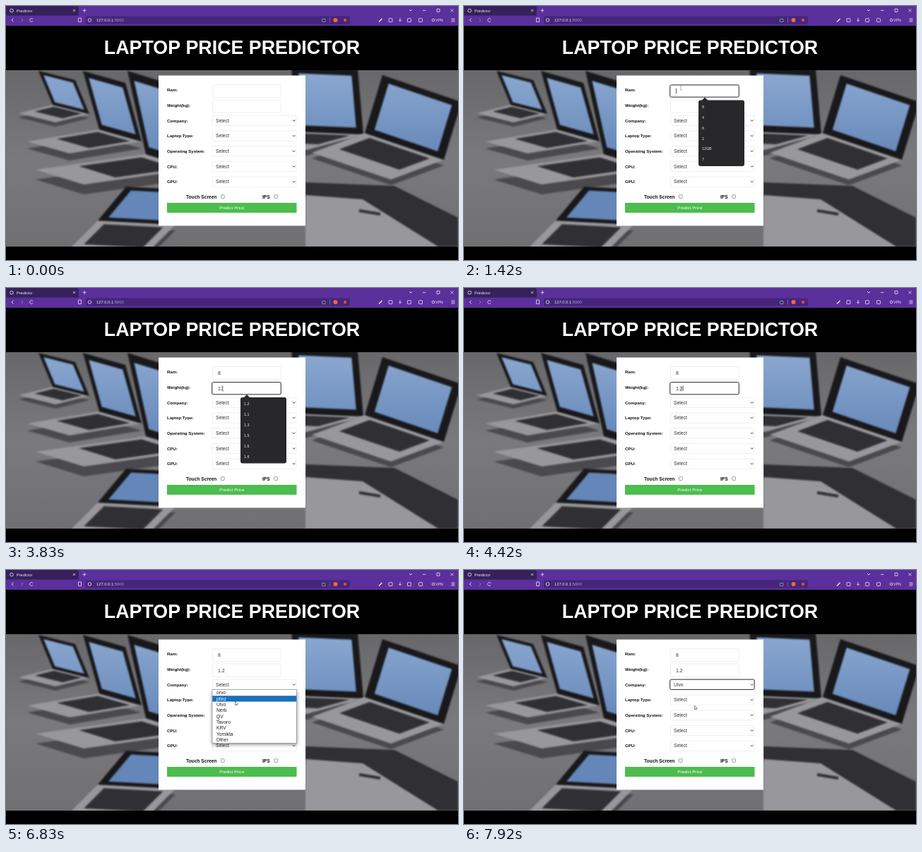
Animation, 640 px wide and 360 px high, one loop 8000 ms. Source, as an HTML page with a canvas:

```html
<!DOCTYPE html>
<html lang="en">
<head>
<meta charset="utf-8">
<title>Predictor</title>
<style>
html, body { margin: 0; width: 100%; height: 100%; overflow: hidden; background: #000; }
canvas { display: block; width: 640px; height: 360px; }
</style>
</head>
<body>
<canvas id="stage"></canvas>
<script>
const LOOP = 8000, W = 640, H = 360;
const dpr = window.devicePixelRatio || 1;
const SANS = '"Liberation Sans", Arial, sans-serif';

function prepare(canvas) {
  canvas.width = W * dpr;
  canvas.height = H * dpr;
  const c = canvas.getContext('2d');
  c.scale(dpr, dpr);
  return c;
}

const screenCtx = prepare(document.getElementById('stage'));
const base = document.createElement('canvas');
let g = prepare(base);

function rect(x, y, w, h, fill) {
  g.fillStyle = fill;
  g.fillRect(x, y, w, h);
}

function round(x, y, w, h, r, fill, stroke, width = 0.8) {
  g.beginPath();
  g.roundRect(x, y, w, h, r);
  if (fill) { g.fillStyle = fill; g.fill(); }
  if (stroke) { g.strokeStyle = stroke; g.lineWidth = width; g.stroke(); }
}

function path(points) {
  g.beginPath();
  points.forEach(p => g.lineTo(p[0], p[1]));
}

function poly(fill, ...points) {
  path(points);
  g.fillStyle = fill;
  g.fill();
}

function line(color, width, ...points) {
  path(points);
  g.strokeStyle = color;
  g.lineWidth = width;
  g.stroke();
}

function dot(x, y, r, fill) {
  g.beginPath();
  g.arc(x, y, r, 0, 7);
  g.fillStyle = fill;
  g.fill();
}

function ring(x, y, r, color, from = 0, to = 7) {
  g.beginPath();
  g.arc(x, y, r, from, to);
  g.strokeStyle = color;
  g.lineWidth = 0.8;
  g.stroke();
}

// V-shaped mark pointing along (dx, dy)
function chevron(x, y, dx, dy, color) {
  line(color, 0.9, [x - dx - dy, y - dy - dx], [x, y], [x - dx + dy, y - dy + dx]);
}

function cross(x, y, r, color) {
  line(color, 0.8, [x - r, y - r], [x + r, y + r]);
  line(color, 0.8, [x - r, y + r], [x + r, y - r]);
}

function text(str, x, y, size, color = '#111', weight = 400, align = 'left') {
  g.font = `${weight} ${size}px ${SANS}`;
  g.fillStyle = color;
  g.textAlign = align;
  g.fillText(str, x, y);
}

function vertical(y0, y1, ...colors) {
  const grad = g.createLinearGradient(0, y0, 0, y1);
  colors.forEach((c, i) => grad.addColorStop(i / (colors.length - 1), c));
  return grad;
}

const FRAME = '#19191c', KEYS = '#303034', SHELL = '#98989c';

// Parallelogram from corner p along u and v, shrunk towards its middle
function panel(fill, p, u, v, inset = 0) {
  const at = (a, b) => [p[0] + u[0] * a + v[0] * b, p[1] + u[1] * a + v[1] * b];
  const lo = inset, hi = 1 - inset;
  poly(fill, at(lo, lo), at(hi, lo), at(hi, hi), at(lo, hi));
}

// Hinge starts at p and runs along hinge; lid and front are the other two edges
function laptop(p, hinge, lid, front, edge) {
  panel('#4a4a4e', [p[0], p[1] + edge], hinge, front);
  panel(SHELL, p, hinge, front);
  panel(KEYS, p, hinge, [front[0] * 0.75, front[1] * 0.75], 0.12);
  panel(FRAME, p, hinge, lid);
  panel(vertical(91, 220, '#8ba8d0', '#6486b8'), p, hinge, lid, 0.1);
}

function drawPhoto() {
  g.save();
  g.beginPath();
  g.rect(0, 91, W, 250);
  g.clip();
  rect(0, 91, W, 250, vertical(91, 341, '#68686b', '#7a7a7d', '#707073'));
  g.filter = 'blur(1.3px)';
  for (let i = 0; i < 3; i++) {
    laptop([66 + 66 * i, 140 + 35 * i], [52 + 8 * i, 13 + 4 * i],
      [-20 - 3 * i, -48 - 35 * i], [-48 - 54 * i, 12 + 5 * i], 6 + 4 * i);
  }
  laptop([130, 304], [110, 6], [40, -48], [-50, 50], 8);
  laptop([412, 178], [94, 4], [-8, -92], [-80, 22], 8);
  laptop([508, 180], [112, 38], [25, -82], [-75, 28], 8);
  poly(KEYS, [424, 250], [550, 255], [640, 300], [640, 341], [610, 341], [424, 272]);
  poly(SHELL, [424, 268], [505, 274], [612, 341], [424, 341]);
  line(KEYS, 4, [500, 290], [530, 295]);
  g.restore();
}

function drawBrowser() {
  const ink = '#eee6f6', dim = '#9a7fc0';
  rect(0, 0, W, 28, '#5b2f9c');
  round(0, 0, 103, 13.5, [0, 3, 0, 0], '#36215c');
  round(113, 14.5, 374, 11, 2, '#45267a');
  ring(8, 6.5, 2.4, ink);
  text('Predictor', 15, 8.6, 5.6, ink);
  cross(96.5, 6.3, 1.5, ink);
  line(ink, 0.8, [108.5, 6.3], [113.5, 6.3]);
  line(ink, 0.8, [111, 3.8], [111, 8.8]);

  chevron(8, 20, -2.4, 0, ink);
  chevron(24, 20, 2.4, 0, dim);
  ring(36, 20, 2.4, ink, 0.5, 5.8);
  round(102.5, 17, 4, 5.5, 0, null, ink);
  ring(118.5, 20, 2.3, ink);
  text('127.0.0.1', 128, 22.1, 5.8, ink);
  text(':5000', 128 + g.measureText('127.0.0.1').width, 22.1, 5.8, '#b29fd0');
  round(447.5, 18.5, 4.5, 4, 0, null, '#86a8a0');
  line(dim, 0.6, [458.5, 16.5], [458.5, 23.5]);
  dot(466.5, 20, 3, '#f06a32');
  dot(480, 20, 2.2, '#e04a48');

  line(ink, 1.4, [528, 22.5], [532.5, 18]);
  for (const x of [542, 568.5, 584.5]) round(x, 17.7, 5, 4.8, 0.6, null, ink);
  line(ink, 0.8, [558, 17], [558, 21.5]);
  chevron(558, 21.7, 0, 1.8, ink);
  ring(605, 20, 1.8, ink);
  text('VPN', 608, 22, 5.2, ink);
  for (let y = 18; y < 23; y += 2) line(ink, 0.8, [630.5, y], [635.5, y]);

  chevron(573, 7, 0, 2, ink);
  line(ink, 0.8, [590, 6.3], [594.5, 6.3]);
  round(610, 4.2, 4, 4, 0, null, ink);
  cross(631.5, 6.3, 2, ink);
}

const LABELS = ['Ram:', 'Weight(kg):', 'Company:', 'Laptop Type:', 'Operating System:', 'CPU:', 'GPU:'];
const BRANDS = ['orvo', 'plinz', 'Ulvo', 'Nerb', 'QV', 'Tavoro', 'KRV', 'Yomikta', 'Other'];
const BORDER = '#ebebf0';
const rowY = i => 119 + i * 21.67;

function checkbox(label, x, boxX) {
  text(label, x, 272.7, 6.65, '#111', 700);
  round(boxX, 267.7, 4.8, 4.8, 0.8, '#fff', '#777', 0.7);
}

function drawForm() {
  rect(216, 98.5, 208, 213, '#fff');
  LABELS.forEach((label, i) => {
    const y = rowY(i);
    text(label, 228, y + 2.2, 6.05, '#111', 700);
    if (i < 2) {
      round(292.5, y - 7.5, 96.5, 18, 1, null, BORDER);
    } else {
      round(292.5, y - 7, 118.5, 14.2, 1, null, BORDER);
      if (i > 2) text('Select', 297, y + 2.4, 6.8, '#333');
      chevron(407.7, y + 0.9, 0, 1.8, '#222');
    }
  });
  checkbox('Touch Screen', 255, 304.4);
  checkbox('IPS', 363, 379.7);
  rect(228, 279, 183.5, 14, '#4cbd4e');
  text('Predict Price', 319.8, 288.2, 6.2, '#fff', 400, 'center');
}

function drawBase() {
  rect(0, 0, W, H, '#000');
  drawPhoto();
  rect(0, 28, W, 63, '#000');
  text('LAPTOP PRICE PREDICTOR', 320, 68.4, 26.8, '#fff', 700, 'center');
  drawBrowser();
  drawForm();
}

function popup(top, items) {
  poly('#28282b', [336.5, top + 0.5], [341, top - 4], [345.5, top + 0.5]);
  round(332, top, 65, 93.5, 3, '#28282b');
  items.forEach((item, i) => text(item, 337, top + 11.3 + i * 14.9, 5.3, '#f0f0f2'));
}

function brandList(active) {
  g.save();
  g.shadowColor = 'rgba(0,0,0,.45)';
  g.shadowBlur = 5 * dpr;
  g.shadowOffsetY = 2 * dpr;
  rect(292, 169.5, 119.5, 76, '#fff');
  g.restore();
  round(292, 169.5, 119.5, 76, 0, null, '#77777c', 0.6);
  BRANDS.forEach((name, i) => {
    const y = 174 + i * 8.34;
    if (i === active) rect(292.3, y - 4.1, 119, 8.3, '#1a6ec0');
    text(name, 298, y + 2.2, 6.7, i === active ? '#fff' : '#222');
  });
}

function focusBox(y, w, h) {
  round(291.7, y, w, h, 1.8, null, '#2c2c34', 1);
}

function typed(str, y, focused) {
  text(str, 300, y, 7, '#333');
  if (focused) {
    const x = 300.4 + g.measureText(str).width;
    line('#111', 0.7, [x, y - 6.2], [x, y + 1.4]);
  }
}

// start, end, dx, dy
const MOVES = [[80, 830, -11, 17], [2500, 2830, 0, 27], [5080, 5250, 13, 18],
  [5500, 6250, 4.5, 25], [7670, 7900, 2, 6]];

function mouseAt(t) {
  let x = 318, y = 99;
  for (const [from, to, dx, dy] of MOVES) {
    const k = Math.min(1, Math.max(0, (t - from) / (to - from)));
    const eased = k * k * (3 - 2 * k);
    x += dx * eased;
    y += dy * eased;
  }
  return [x, y];
}

function drawMouse(t) {
  if (t < MOVES[0][0]) return;
  const [x, y] = mouseAt(t);
  const overField = t > 600 && t < 5150;
  if (overField) {
    const color = '#9a9aa4';
    line(color, 0.8, [x, y - 3], [x, y + 3]);
    for (const end of [-3, 3]) line(color, 0.8, [x - 1.3, y + end], [x + 1.3, y + end]);
  } else {
    const tip = [[x, y], [x, y + 5.8], [x + 1.6, y + 4.5], [x + 4, y + 4.2], [x, y]];
    poly('#fff', ...tip);
    line('#444', 0.6, ...tip);
    line('#444', 0.8, [x + 1.6, y + 4.5], [x + 2.5, y + 6.2]);
  }
}

const CLICK_RAM = 1000, TYPE_RAM = 1830, CLICK_WEIGHT = 3000, TYPE_WEIGHT = [3500, 3800, 4250];
const OPEN_LIST = 5380, HOVER = [5650, 5780, 6920], PICK = 7420;
const passed = (times, t) => times.filter(at => t >= at).length;

function draw(t) {
  g.drawImage(base, 0, 0, W, H);
  const inRam = t >= CLICK_RAM && t < CLICK_WEIGHT;
  const inWeight = t >= CLICK_WEIGHT && t < OPEN_LIST;
  if (inRam) focusBox(111.9, 97.6, 17.2);
  if (inWeight) focusBox(133.6, 97.6, 17.2);
  typed(t >= TYPE_RAM ? '8' : '', 122.8, inRam);
  typed('1.2'.slice(0, passed(TYPE_WEIGHT, t)), 144.6, inWeight);

  text(t >= PICK ? BRANDS[2] : 'Select', 297, rowY(2) + 2.4, 6.8, '#333');
  if (t >= PICK) focusBox(155.1, 119.5, 14.3);

  if (inRam && t < TYPE_RAM) popup(133.5, ['8', '4', '6', '2', '12GB', '7']);
  if (t >= CLICK_WEIGHT + 80 && t < TYPE_WEIGHT[2]) {
    popup(155, ['1.2', '1.1', '1.3', '1.5', '1.6', '1.8']);
  }
  if (t >= OPEN_LIST && t < PICK) brandList(passed(HOVER, t) - 1);
  drawMouse(t);
}

drawBase();
g = screenCtx;
const start = performance.now();
function tick() {
  draw((performance.now() - start) % LOOP);
  requestAnimationFrame(tick);
}
tick();
</script>
</body>
</html>
```
